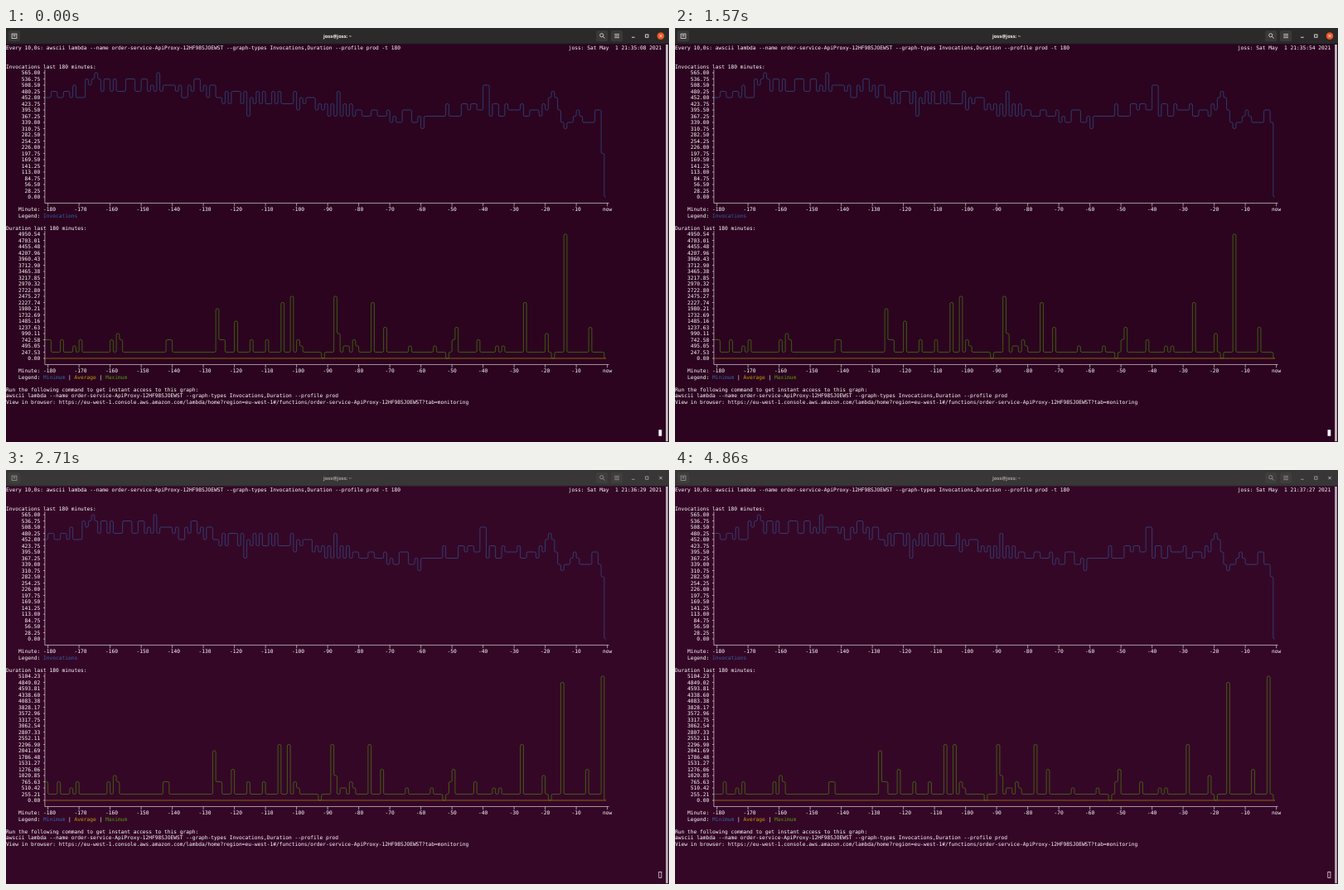
Animation of 800 by 500 pixels, one loop 5010 ms. Source, as an HTML page with a canvas:

```html
<!DOCTYPE html>
<html lang="en">
<head>
<meta charset="utf-8">
<title>Terminal dashboard</title>
<style>
html, body { margin: 0; width: 100%; height: 100%; overflow: hidden; background: #2c0420; }
canvas { display: block; width: 800px; height: 500px; }
</style>
</head>
<body>
<canvas id="stage" width="800" height="500"></canvas>
<script>
const ctx = document.getElementById('stage').getContext('2d');

// The terminal is laid out on a 1920-wide screen with 9 x 18 cells.
const SCALE = 800 / 1920, CW = 9, CH = 18, TOP = 48.6;
const LOOP = 5010, BLUR_AT = 2140, REFRESH = 400, LEAD = 150;
const MONO = '14.95px "DejaVu Sans Mono", "Noto Sans Mono", monospace';
const WHITE = '#ffffff', BLUE = '#3465a4', GREEN = '#4e9a06', YELLOW = '#c4a000';
const MAX_BEFORE = 4950.537, MAX_AFTER = 5104.23;
const USER = 'joss';
const COMMAND = 'awscii lambda --name order-service-ApiProxy-12HF98SJOEWST' +
  ' --graph-types Invocations,Duration --profile prod';
const LINK = 'https://eu-west-1.console.aws.amazon.com/lambda/home?region=eu-west-1#' +
  '/functions/order-service-ApiProxy-12HF98SJOEWST?tab=monitoring';

function seeded(seed) {
  return () => (seed = (seed * 16807) % 2147483647) / 2147483647;
}

function between(points, x) {
  const i = Math.max(1, points.findIndex(p => p[0] >= x));
  const [x0, y0] = points[i - 1], [x1, y1] = points[i];
  return y0 + (y1 - y0) * (x - x0) / (x1 - x0);
}

// Rows below the chart's top: a slow trend, a jitter that flips side, a few spikes.
function makeCalls() {
  const trend = [[0, 3], [5, 4], [12, 2], [50, 2.5], [56, 4], [72, 3.8], [90, 5.6],
    [114, 7.2], [121, 8], [125, 5.7], [150, 5.6], [158, 6.5], [163, 4.3], [167, 9],
    [171, 6], [173, 8], [176, 8], [177, 6], [178, 6], [179, 8], [181, 8]];
  const spikes = { 16: 0, 36: 0, 65: 7, 94: 3, 121: 9, 141: 2 };
  const rand = seeded(2021), rows = [];
  let side = 1;
  for (let m = 0; m <= 180; m++) {
    const hold = rand() < 0.33, size = 0.3 + rand();
    if (!hold) side = -side;
    const jitter = m < 166 ? side * size : 0;
    const row = Math.round(between(trend, m) + jitter);
    rows.push(spikes[m] ?? (hold && m && m < 160 ? rows[m - 1] : row));
  }
  return rows;
}

// Heights in rows: usually one, small seeded bumps and dips, and the tall peaks.
function makePeaks() {
  const tall = { 23: 4, 55: 8, 56: 3, 57: 3, 61: 5.6, 76: 9, 79: 9.6, 93: 9.6,
    105: 9, 109: 5, 132: 5, 154: 9, 167: 20, 175: 5, 180: 20.6 };
  const rand = seeded(180);
  return Array.from({ length: 182 }, (_, m) => {
    const r = rand(), bump = 2 + Math.floor(rand() * 2.5);
    if (tall[m]) return tall[m];
    if (m > 176) return 1;
    if (r < 0.11) return bump;
    return m > 76 && r > 0.93 ? 0 : 1;
  });
}

const calls = makeCalls(), peaks = makePeaks();

// The newest minute fills up from one refresh to the next.
const filling = [13, 13, 10, 10, 8];

const colX = c => c * CW;
const midY = row => TOP + (row + 0.5) * CH;

function text(str, col, row, color = WHITE) {
  ctx.fillStyle = color;
  ctx.fillText(str, colX(col), midY(row) + 5.4);
}

function line(points, color, width = 1.35) {
  ctx.strokeStyle = color;
  ctx.lineWidth = width;
  ctx.beginPath();
  points.forEach(([x, y], i) => i ? ctx.lineTo(x, y) : ctx.moveTo(x, y));
  ctx.stroke();
}

function stepLine(rows, top, color) {
  const x = k => colX(12.5 + k), y = r => midY(top + r), n = rows.length;
  ctx.strokeStyle = color;
  ctx.lineWidth = 1.4;
  ctx.beginPath();
  ctx.moveTo(x(0), y(rows[0]));
  for (let k = 1; k < n; k++) {
    if (rows[k] === rows[k - 1]) continue;
    ctx.arcTo(x(k), y(rows[k - 1]), x(k), y(rows[k]), 4);
    ctx.arcTo(x(k), y(rows[k]), x(k + 1), y(rows[k]), 4);
  }
  ctx.lineTo(colX(193), y(rows[n - 1]));
  ctx.stroke();
}

function chart(title, max, row, legend) {
  text(title, 0, row);
  const top = row + 1, axis = colX(12.5), base = midY(top + 21);
  for (let r = 0; r <= 20; r++) {
    const label = (max * (20 - r) / 20).toFixed(2);
    text(label, 11 - label.length, top + r);
    line([[colX(12), midY(top + r)], [axis, midY(top + r)]], WHITE);
  }
  line([[axis, midY(top) - CH / 2], [axis, base], [colX(194), base]], WHITE);
  text('Minute:', 4, top + 22);
  for (let k = 0; k <= 18; k++) {
    const x = colX(13.5 + 10 * k);
    line([[x, base], [x, base + CH / 2]], WHITE);
    text(k < 18 ? String(10 * k - 180) : 'now', 12 + 10 * k, top + 22);
  }
  text('Legend:', 4, top + 23);
  legend.forEach(([name, color], i) => {
    text(name, 12 + 10 * i, top + 23, color);
    if (i) text('|', 10 + 10 * i, top + 23);
  });
}

function button(x, color) {
  ctx.fillStyle = color;
  ctx.beginPath();
  ctx.roundRect(x - 17, 7, 34, 32, 5);
  ctx.fill();
}

function circle(x, y, r) {
  ctx.beginPath();
  ctx.arc(x, y, r, 0, 2 * Math.PI);
}

function titleBar(focused) {
  const ink = focused ? '#f2f1f0' : '#a3a19f';
  const face = focused ? '#3b3938' : '#403e3d';
  ctx.fillStyle = focused ? '#2b2929' : '#383636';
  ctx.fillRect(0, 0, 1920, 46);
  ctx.fillStyle = focused ? '#1c1a1a' : '#2a2828';
  ctx.fillRect(0, 45, 1920, 2);

  [24, 1726, 1769].forEach(x => button(x, face));
  ctx.strokeStyle = ink;
  ctx.lineWidth = 1.8;
  ctx.strokeRect(17, 17, 14, 13);
  line([[24, 26], [24, 20]], ink, 1.8);
  line([[21, 23], [24, 20], [27, 23]], ink, 1.8);
  circle(1725, 21, 5);
  ctx.stroke();
  line([[1729, 25], [1734, 30]], ink, 2);
  [18, 23, 28].forEach(y => line([[1762, y], [1776, y]], ink, 1.8));

  line([[1812, 27], [1821, 27]], ink, 2);
  ctx.strokeRect(1852, 19, 8, 8);
  if (focused) {
    ctx.fillStyle = '#e95420';
    circle(1896, 23, 10.5);
    ctx.fill();
  }
  const cross = focused ? '#ffffff' : '#d0cecc';
  line([[1892, 19], [1900, 27]], cross, 2);
  line([[1900, 19], [1892, 27]], cross, 2);

  ctx.font = 'bold 14px "Open Sans", "Noto Sans", sans-serif';
  ctx.textAlign = 'center';
  ctx.fillStyle = ink;
  ctx.fillText(`${USER}@${USER}: ~`, 960, 28);
  ctx.textAlign = 'left';
}

function scrollBar(focused) {
  ctx.fillStyle = focused ? '#d3cfd1' : '#c4bfc2';
  ctx.fillRect(1911, 48, 6, 1150);
}

function clock(tick) {
  const s = 35 * 60 + 8 + Math.floor(tick * 11.6);
  const pad = n => String(n).padStart(2, '0');
  return `${USER}: Sat May  1 21:${pad(Math.floor(s / 60))}:${pad(s % 60)} 2021`;
}

function draw(t) {
  const focused = t < BLUR_AT;
  const tick = Math.floor((t + LEAD) / REFRESH);
  const shift = Math.floor(tick / 5);
  const slow = tick >= 6;
  const max = slow ? MAX_AFTER : MAX_BEFORE;

  ctx.setTransform(SCALE, 0, 0, SCALE, 0, 0);
  ctx.textRendering = 'geometricPrecision';
  ctx.fillStyle = focused ? '#2c0420' : '#350727';
  ctx.fillRect(0, 0, 1920, 1200);
  titleBar(focused);
  scrollBar(focused);

  ctx.font = MONO;
  text(`Every 10,0s: ${COMMAND} -t 180`, 0, 0);
  const now = clock(tick);
  text(now, 211 - now.length, 0);

  chart('Invocations last 180 minutes:', 565, 3, [['Invocations', BLUE]]);
  stepLine([...calls.slice(shift, shift + 179), filling[tick % 5], 20], 4, BLUE);

  chart('Duration last 180 minutes:', max, 29,
    [['Minimum', BLUE], ['Average', YELLOW], ['Maximum', GREEN]]);
  stepLine([20, 20], 30, YELLOW);
  const heights = peaks.slice(shift, shift + 180);
  if (!slow) heights[179] = 1;
  stepLine([...heights.map(h => 20 - Math.round(h * MAX_BEFORE / max)), 20], 30, GREEN);

  text('Run the following command to get instant access to this graph:', 0, 55);
  text(COMMAND, 0, 56);
  text('View in browser: ' + LINK, 0, 57);

  const cx = colX(210), cy = midY(62) - CH / 2;
  ctx.fillStyle = ctx.strokeStyle = WHITE;
  ctx.lineWidth = 1.6;
  if (focused) ctx.fillRect(cx, cy, CW, CH);
  else ctx.strokeRect(cx + 0.8, cy + 0.8, CW - 1.6, CH - 1.6);
}

const start = performance.now();
function loop() {
  draw((performance.now() - start) % LOOP);
  requestAnimationFrame(loop);
}
loop();
</script>
</body>
</html>
```
